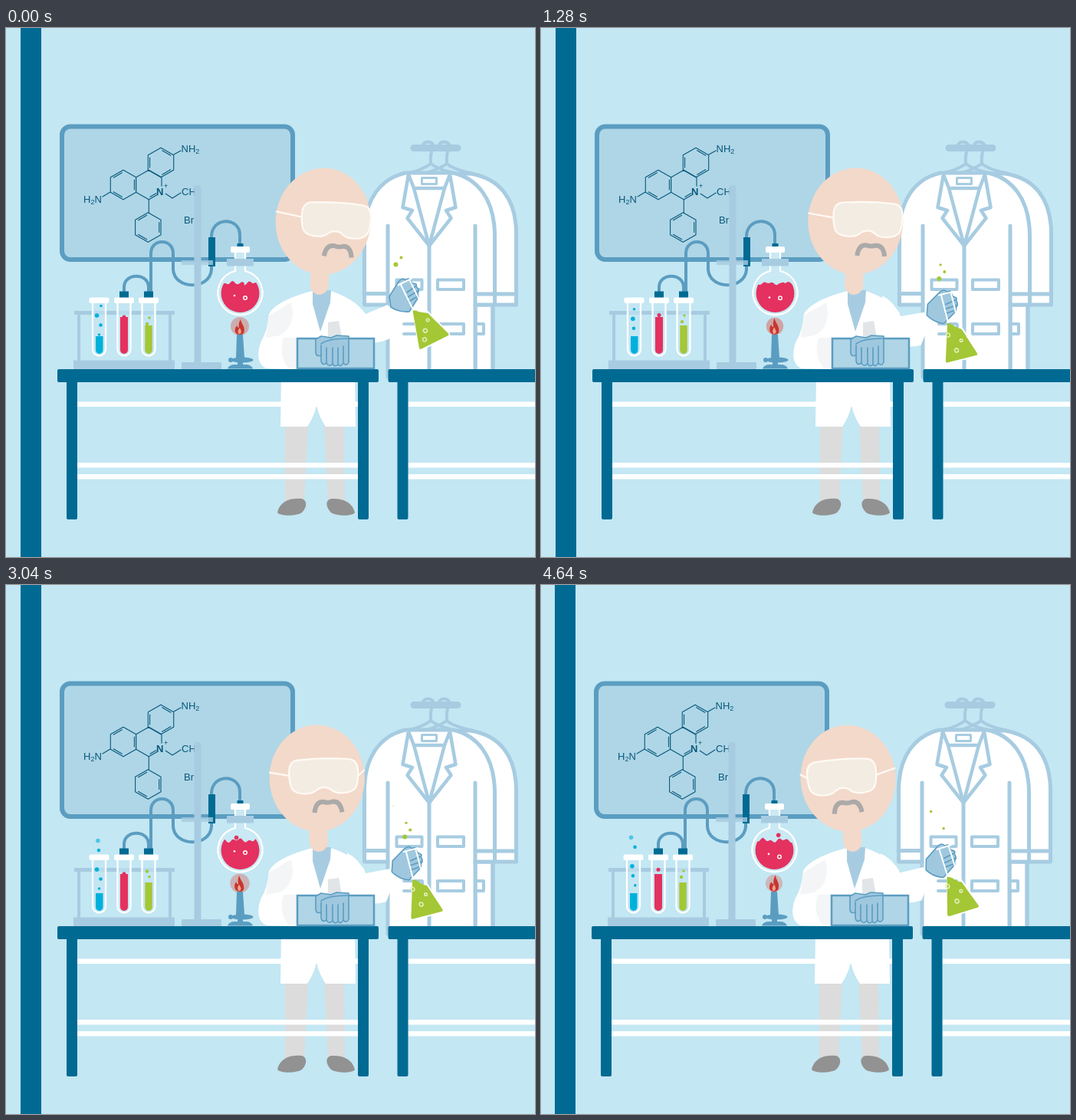
Animation, 690 px wide and 690 px high, one loop 4720 ms. Source, as an HTML page:

```html
<!DOCTYPE html>
<html lang="en">
<head>
<meta charset="utf-8">
<title>Laboratory</title>
<style>
html, body { margin: 0; width: 100%; height: 100%; overflow: hidden; background: #c3e7f3; }
svg { display: block; width: 100vw; height: 100vh; }
text { font: 13px "Liberation Sans", Arial, sans-serif; fill: #08587d; }
.sub { font-size: 9px; }
.dark { fill: #006a93; }
.pale { fill: #a7cce1; }
.mid { fill: #5b9dc1; }
.white { fill: #fff; }
.line { fill: none; stroke-linecap: round; stroke-linejoin: round; }
.bond { stroke: #08587d; stroke-width: 1.1; }
.tubing { stroke: #5b9dc1; stroke-width: 4; }
.coat { stroke: #a7cce1; stroke-width: 5; stroke-linejoin: round; stroke-linecap: round; }
.glove { fill: #9fc8df; stroke: #5b9dc1; stroke-width: 1.6; stroke-linejoin: round; stroke-linecap: round; }
.glass { stroke: #fff; stroke-width: 2.3; }
</style>
</head>
<body>
<svg viewBox="0 0 690 690">
<defs>
  <clipPath id="bulb"><circle cx="305.500" cy="346" r="25"/></clipPath>
  <g id="tube">
    <path class="line glass" d="M-8.500 357V419a8.500 8.500 0 0 0 17 0V357" style="fill:#c3e7f3;fill-opacity:.6"/>
    <rect class="white" x="-13" y="351.500" width="26" height="7.500" rx="2"/>
  </g>
  <g id="frame">
    <path class="white" d="M93 487.500H459V494H93zM93 567H459V573.500H93zM93 582H459V588.500H93z"/>
    <rect class="dark" x="79" y="455" width="14" height="186" rx="2"/>
    <rect class="dark" x="459" y="455" width="14" height="186" rx="2"/>
    <rect class="dark" x="67" y="445" width="419" height="17" rx="2"/>
  </g>
</defs>
<rect x="-5" width="700" height="690" fill="#c3e7f3"/>
<g id="stage">
  <rect class="dark" x="19" width="27" height="690"/>

  <!-- board -->
  <rect x="73" y="128.500" width="301" height="173.500" rx="11" fill="#afd6e6" stroke="#5b9dc1" stroke-width="6"/>
  <path id="rings" class="line bond"/>
  <path class="line bond" d="M219 165L228 160M136 214L126 220M186.300 224V241M208 216L217 222L228 215"/>
  <circle cx="202" cy="213" r="6.500" fill="#afd6e6"/>
  <text x="228.500" y="162">NH<tspan class="sub" dy="2">2</tspan></text>
  <text x="101" y="228">H<tspan class="sub" dy="2">2</tspan><tspan dy="-2">N</tspan></text>
  <text x="196" y="218" style="font-weight:bold">N</text>
  <text class="sub" x="206" y="209">+</text>
  <text x="229" y="218">CH</text>
  <text x="232" y="255">Br</text>

  <!-- tubing and stand -->
  <path class="line tubing" d="M154 346V338C154 319 186 319 186 338V346M189 346V294C189 274 218 274 218 294V315C220 342 266 342 268 315V272C268 246 305 246 305 270V284"/>
  <path class="dark" d="M148 343.500h12v9h-12zM180 343.500h12v9h-12zM264 273h9v38h-9zM301.500 281h8v5h-8z"/>
  <g class="pale">
    <rect x="229" y="303" width="41" height="6" opacity=".8"/>
    <rect x="245.500" y="205" width="9" height="236" rx="3"/>
    <rect x="229" y="436" width="52" height="9" rx="1"/>
    <rect x="89" y="369" width="131" height="5"/>
    <path d="M93 374h4v60h-4zM212 374h4v60h-4zM88 433.500h132V445H88z"/>
  </g>

  <!-- test tubes -->
  <use href="#tube" x="121.500"/><use href="#tube" x="154"/><use href="#tube" x="186"/>
  <path fill="#00b1dc" d="M117 402h9.500V420a4.750 5 0 0 1-9.500 0z"/>
  <path fill="#e4315f" d="M149 377h10V420a5 5 0 0 1-10 0z"/>
  <path fill="#a4c735" d="M181.300 388h9.500V420a4.750 5 0 0 1-9.500 0z"/>

  <!-- round flask -->
  <path class="line glass" d="M299 293V317A29 29 0 1 0 312 317V293" style="fill:#c9e9f4"/>
  <rect class="pale" x="288" y="301" width="35" height="9.500"/>
  <rect class="white" x="293" y="285" width="25" height="8" rx="2"/>
  <path id="pink" fill="#e4315f" clip-path="url(#bulb)"/>
  <g id="bubbles"></g>

  <!-- burner -->
  <circle id="glow" cx="305" cy="389" r="12" fill="#d48c88"/>
  <g id="flame">
    <path fill="#c7362d" d="M0 0C-8 0-8-8-4-12C-3-9-2-9-1-10C-2-15 0-18 1-20C2-14 7-11 6-5C6-2 4 0 0 0Z"/>
    <path fill="#f2a193" d="M0-1C-4-1-3-6 0-9C1-6 4-3 0-1Z"/>
  </g>
  <g class="mid">
    <path d="M301 400H309L311 430H300ZM302 434H309V439H302ZM289 444.500Q291 439 298 439H313Q320 439 322 444.500Z"/>
    <ellipse cx="308" cy="433" rx="14.500" ry="3.500"/>
    <circle cx="293" cy="433" r="3"/>
  </g>

  <!-- hanging coats -->
  <path class="line coat" d="M532 156.500H589" style="stroke-width:9"/>
  <path class="line coat" d="M544 152q3-5 9-3t4 8q-4 6-3 20M565 152q3-5 9-3t4 8q-4 6-3 20M522 190Q544 185 554 177Q564 185 588 190M544 190Q564 185 575 177Q585 185 610 190" style="stroke-width:4"/>
  <g class="coat white">
    <path d="M585 190H606C643 196 666 222 665.500 270V361H612V450H635V362"/>
    <path d="M521 189H583C614 196 637 222 637.500 270V361H612V455H498V361H467.500V270C467 222 490 196 521 189Z"/>
    <path class="line" d="M467 346.500H498M612 347H665M498 258V361M612 258V361M637.500 347V361M635 362V446M552 285V446"/>
    <g style="stroke-width:4.500">
      <path d="M525 191L517.500 234L530 238L523.500 248L552 284L580.500 248L574 238L586.500 234L579 191L572 209H532Z"/>
      <path class="line" d="M532 209L552 284L572 209"/>
    </g>
    <path class="line" d="M542.500 195.500h19v8h-19z" style="stroke-width:3"/>
    <path class="line" d="M509.500 328.500h33v12.500h-33zM563 328.500h34v12.500h-34zM519 386h24v13h-24M563 386h34v13h-34zM612 386h11v13h-11" style="stroke-width:4"/>
  </g>

  <!-- legs and tables -->
  <path fill="#dcdcdc" d="M364 515H394L389 618H364ZM415 515H441L442 618H420Z"/>
  <path fill="#929292" d="M354 632C358 616 372 613 386 614C393 616 393 625 386 632C378 637 358 637 354 632ZM455 632C452 618 438 613 424 614C416 616 417 625 424 632C432 637 452 637 455 632Z"/>
  <path class="white" d="M359 455H455L456 520H417Q408 507 405 492Q402 507 393 520H358Z"/>
  <use href="#frame"/><use href="#frame" x="431.500"/>

  <!-- torso and head -->
  <path class="white" d="M400 343C372 350 350 360 343 373Q341 396 333 408C328 420 326 439 340 444L379 445V407H455L468 372Q456 354 424 343Z"/>
  <path fill="#f4f5f6" d="M372 358L343 375L339 404L357 401Q374 392 374 371ZM362 404q-7 22 6 39h11v-39z"/>
  <path fill="#e1e5e8" d="M420 384L434 382L438 404H420Z"/>
  <path class="pale" d="M400 342H424L423 358L410 396L400 360Z"/>
  <g id="head">
    <path fill="#f3d9ca" d="M396 305H420V337Q418 347 408 348Q398 347 396 337Z"/>
    <ellipse cx="408" cy="252" rx="62" ry="69.500" fill="#f3d9ca"/>
    <path id="strap" class="line" stroke="#fffaf4" stroke-width="2.200"/>
    <path id="lens" fill="#f3ece2" stroke="#fffaf4" stroke-width="2.200" d="M-33-22Q0-25 33-22Q45-21 45-6Q45 10 41 16Q36 22 24 22Q14 22 9 17Q5 14 0 14Q-5 14-9 17Q-14 22-24 22Q-36 22-41 16Q-45 10-45-6Q-45-21-33-22Z"/>
    <path id="tache" class="line" stroke="#abaaa9" stroke-width="6" d="M-18 7Q-16-8-6-7Q0-5 6-7Q16-8 18 7" style="stroke-linecap:butt"/>
  </g>

  <!-- raised arm with flask -->
  <g id="arm">
    <path class="white" d="M440 352Q456 356 469 373L498 361L508 374L503 404Q478 417 448 405Z"/>
    <path class="glove" d="M500 350L512 331Q517 325 521 329L525 327L530 333Q537 333 535 337Q540 342 537 346L538 351L526 370Q512 371 502 364Z"/>
    <path class="line glove" d="M523 345L534 337M524 351L537 343M525 357L537 350" style="fill:none"/>
    <g transform="translate(559 410) rotate(-26.500)">
      <path class="line glass" d="M-6-88V-50L-22-2Q-22 1-20 1H20Q22 1 22-2L7-48V-88M-9-88H10" style="stroke-width:2"/>
      <path id="green" fill="#a4c735"/>
      <g class="line" stroke="#e5f0bd" stroke-width="1.500">
        <circle id="fizz1" cx="-4" r="2.500"/><circle id="fizz2" cx="5" r="1.800"/><circle id="fizz3" cx="-10" r="2.500"/>
      </g>
    </g>
  </g>
  <g id="drops" fill="#a4c735"></g>

  <!-- box with gloves -->
  <rect x="380" y="405" width="100" height="39" fill="#afd5e6" stroke="#5b9dc1" stroke-width="2.500"/>
  <path class="glove" d="M404 406L411 402L424 404L431 401L447 402V436Q444 442 440 437Q437 443 433 439Q429 443 426 438Q421 443 418 437Q412 441 411 434V427Q405 429 404 424Z"/>
  <path class="line glove" d="M411 427V414M418 437V417M426 438V417M433 439V417M440 437V415M411 412Q420 405 446 405" style="fill:none"/>
</g>
</svg>
<script>
const LOOP = 4720, STEP = 80, SHAKE = 1800;
const el = id => document.getElementById(id);
const set = (id, name, value) => el(id).setAttribute(name, value);
const dot = (x, y, r, fill = "", opacity = 1) =>
  `<circle cx="${x}" cy="${y}" r="${r}" opacity="${opacity}" ${fill && `fill="${fill}"`}/>`;

// Hexagon with the listed edges doubled on the inside.
function ring(cx, cy, doubles) {
  const at = (i, r) => {
    const a = (i * 60 - 90) * Math.PI / 180;
    return `${cx + r * Math.cos(a)} ${cy + r * Math.sin(a)}`;
  };
  let d = "M" + [0, 1, 2, 3, 4, 5].map(i => at(i, 19.3)).join("L") + "Z";
  for (const i of doubles) d += `M${at(i + .1, 15.8)}L${at(i + .9, 15.8)}`;
  return d;
}
set("rings", "d", ring(153, 204.5, [1, 3, 5]) + ring(202, 175.5, [0, 2, 4]) +
  ring(186.3, 204.5, [2]) + ring(185.3, 260, [1, 3, 5]));

// Linear interpolation through [time, value] pairs.
function tween(keys, t) {
  const i = Math.max(1, keys.findIndex(k => k[0] >= t));
  const [[t0, a], [t1, b]] = [keys[i - 1], keys[i]];
  return a + (b - a) * (t - t0) / (t1 - t0);
}
const swing = [[0, 0], [300, 0], [560, .17], [1040, .74], [1280, 1], [1620, .85], [1800, 0]];

function drawHead(t) {
  const x = t < 2400 ? 408 + 16.8 - t / 1600 : 408 + 15.3 - (t - 2400) * .0104;
  set("head", "transform", `rotate(${3.5 - 7.5 * t / 4640} 408 345)`);
  set("lens", "transform", `translate(${x} 250)`);
  set("tache", "transform", `translate(${x + 5} 290)`);
  set("strap", "d", `M346.5 243L${x - 45} 248M${x + 45} 250L469.5 243`);
}

function drawArm(t) {
  const phase = t % SHAKE, slosh = 2 * Math.sin(t / 130);
  set("arm", "transform", `rotate(${12.5 * tween(swing, phase)} 455 375)`);
  set("green", "d", `M-19 0H19Q22 0 21-3L9-38Q5-${41 + slosh} 2-43Q-1-${45 - slosh}-3-48L-7-50L-21-3Q-22 0-19 0Z`);
  [1, 2, 3].forEach(i => set("fizz" + i, "cy", -8 - (t * .02 + i * 11) % 32));
  const rise = ([start, x, y, r]) => {
    const age = (phase - start + SHAKE) % SHAKE;
    return age < 760 ? dot(x - age * .021, y - age * .036, r, "", Math.min(1, (760 - age) / 150)) : "";
  };
  el("drops").innerHTML = [[1200, 521, 330, 3], [1200, 528, 321, 2],
    [500, 521, 315, 1.7], [1000, 527, 319, 1.7]].map(rise).join("");
}

function drawLiquids(t) {
  const bump = 1 + 2.5 * Math.abs(Math.sin(t / 480 + 1));
  let surface = "M278 375V335";
  for (let x = 279; x <= 333; x += 2)
    surface += `L${x} ${333 + bump * Math.sin(x * .42 + t / 170) * Math.cos(x * .17 - t / 260)}`;
  set("pink", "d", surface + "V375Z");

  let out = "";
  for (let i = 0; i < 6; i++) {
    const y = 400 - (t * .026 + i * 12.5) % 75;
    if (y > 362 || (t > 2300 && y < 350))
      out += dot(121.5 + 3 * Math.sin(i * 2.4), y, 1.8 + i % 3 * .5, "#00b1dc", y < 340 ? .6 : 1);
  }
  for (let i = 0; i < 2; i++)
    out += dot(184 + i * 3, 386 - (t * .014 + i * 8) % 15, 2.2 - i * .5, "#a4c735");
  out += dot(154, 377 - (t * .009) % 9, 2.5, "#e4315f");
  const pop = (t * .012 + 1) % 16;
  out += dot(308 + 8 * Math.sin(t / 700), 335 - pop, 2.8, "#e4315f", pop > 11 ? .6 : 1);
  const ringDot = (x, y) => `<circle cx="${x}" cy="${y}" r="2.3" fill="none" stroke="#fff" stroke-width="1.4"/>`;
  out += ringDot(312, 352 - 3 * Math.sin(t / 400)) + dot(298, 349 + 4 * Math.sin(t / 520), 1.3, "#fff");
  el("bubbles").innerHTML = out;
}

function drawFlame(t) {
  set("glow", "r", 12 + Math.sin(t / 110));
  set("glow", "opacity", .65 + .2 * Math.sin(t / 190));
  set("flame", "transform",
    `translate(305 400) skewX(${5 * Math.sin(t / 150)}) scale(.95 ${1 + .08 * Math.sin(t / 90)})`);
}

function draw() {
  const t = Math.floor(performance.now() % LOOP / STEP) * STEP;
  drawHead(t);
  drawArm(t);
  drawLiquids(t);
  drawFlame(t);
  set("stage", "transform", `translate(${t >= 4560 ? -1 : 0} 0)`);
  requestAnimationFrame(draw);
}
draw();
</script>
</body>
</html>
```
